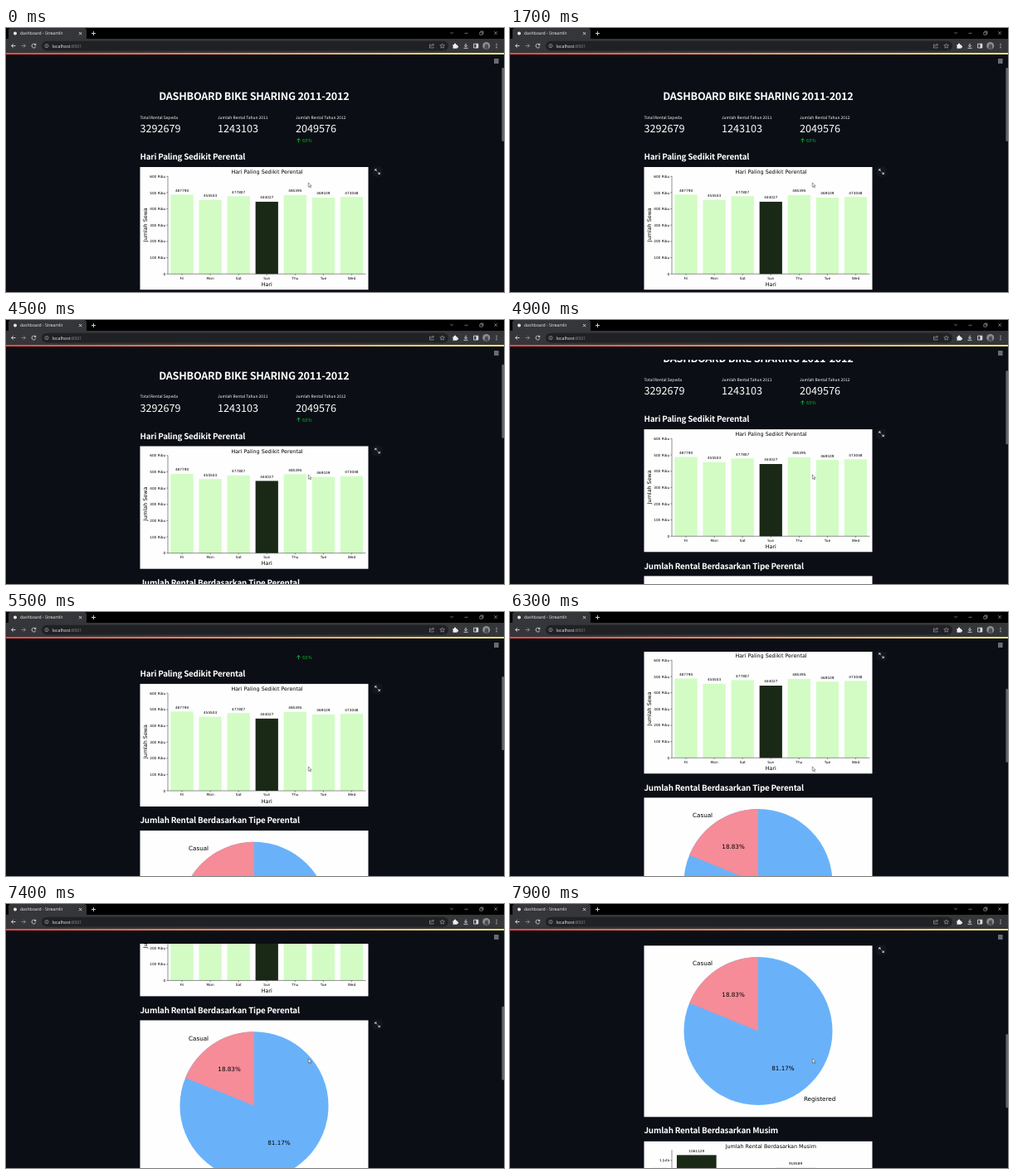
An HTML page for the animation above (8 s loop, 600 by 319 pixels).

```html
<!DOCTYPE html>
<html lang="id">
<head>
<meta charset="utf-8">
<title>Dashboard</title>
<style>
  html, body { margin: 0; width: 100%; height: 100%; overflow: hidden; background: #0b0e15; }
  svg { display: block; width: 100%; height: 100%; text-rendering: geometricPrecision; }
  .app { font-family: "Noto Sans CJK JP", "Noto Sans CJK SC", "Noto Sans CJK", sans-serif; fill: #fff; }
  .plot { font-family: "DejaVu Sans", sans-serif; fill: #000; }
  .ui { font-family: "Open Sans", "Noto Sans", sans-serif; fill: #f4f5f7; }
  .bold { font-weight: 600; letter-spacing: -.02em; }
  .icon { fill: none; stroke: #dcdee2; stroke-width: .9; }
  .thin { fill: none; stroke: #b4b6ba; stroke-width: .6; }
  .axis { fill: none; stroke: #222; stroke-width: .5; }
</style>
</head>
<body>
<svg id="stage" viewBox="0 0 600 319"></svg>
<script>
const LOOP = 8000, STEP = 100;
const PINK = '#f58c98', BLUE = '#69b2fa', LIGHT = '#d2fcc4', DARK = '#1a2916', GREEN = '#15b034';

// y is the middle of the capitals
const text = (cls, x, y, size, str, anchor = 'start', extra = '') =>
  `<text class="${cls}" x="${x}" y="${y + size * .365}" font-size="${size}" text-anchor="${anchor}" ${extra}>${str}</text>`;
const rect = (x, y, w, h, fill, r = 0) =>
  `<rect x="${x}" y="${y}" width="${w}" height="${h}" rx="${r}" fill="${fill}"/>`;
const path = (d, cls = 'icon', extra = '') => `<path class="${cls}" d="${d}" ${extra}/>`;
const label = (x, y, size, str, anchor = 'middle') => text('plot', x, y, size, str, anchor);
const heading = (y, str) => text('app bold', 161.5, y, 9.8, str);
const paper = (y, h) => rect(161.5, y, 275, h, '#fdfefd');

function barColumn(center, top, bottom, width, value, fill) {
  return rect(center - width / 2, top, width, bottom - top, fill) + label(center, top - 5.1, 4.26, value);
}

function yTick(y, str) {
  return path(`M193.3 ${y}H195`, 'axis') + label(192.2, y, 4.26, str, 'end');
}

function metrics() {
  const items = [
    [161.5, 'Total Rental Sepeda', 3292679],
    [255, 'Jumlah Rental Tahun 2011', 1243103],
    [349, 'Jumlah Rental Tahun 2012', 2049576]
  ];
  return items.map(([x, name, value]) =>
    text('app', x, 108, 4.92, name) + text('app', x, 121.7, 12.65, value)).join('') +
    path('M352.5 138.4V133.6M350.4 135.7L352.5 133.6L354.6 135.7', 'icon', `style="stroke:${GREEN}"`) +
    text('app', 357, 136, 5.75, '65%', 'start', `style="fill:${GREEN}"`);
}

function dayChart() {
  const days = { Fri: 487790, Mon: 455503, Sat: 477807, Sun: 444027, Thu: 485395, Tue: 469109, Wed: 473048 };
  const base = 297.2, per100 = 19.65, pitch = 34.07;
  let out = paper(168, 148.2) + label(314.5, 173.8, 6.39, 'Hari Paling Sedikit Perental');
  Object.entries(days).forEach(([day, value], i) => {
    const x = 195 + pitch * (i + .5);
    out += barColumn(x, base - value / 1e5 * per100, base, pitch * .8, value, day === 'Sun' ? DARK : LIGHT) +
      path(`M${x} ${base}v1.7`, 'axis') + label(x, base + 4.8, 4.26, day);
  });
  for (let i = 0; i <= 6; i++) out += yTick(base - i * per100, i ? `${i}00 Ribu` : '0');
  return out + path(`M195 179.2V${base}H433.5`, 'axis') +
    label(314.3, 309.4, 6.39, 'Hari') +
    text('plot', 0, 0, 6.39, 'Jumlah Sewa', 'middle', 'transform="translate(167.3 237.7) rotate(-90)"');
}

function pieChart() {
  const cx = 299, cy = 448.5, r = 89.5, share = .1883;
  const at = (angle, k) => [cx - r * k * Math.sin(angle), cy - r * k * Math.cos(angle)];
  const turn = share * 2 * Math.PI, mid = turn / 2;
  const [ex, ey] = at(turn, 1);
  return paper(345.3, 207) +
    `<circle cx="${cx}" cy="${cy}" r="${r}" fill="${BLUE}"/>` +
    `<path d="M${cx} ${cy}V${cy - r}A${r} ${r} 0 0 0 ${ex} ${ey}Z" fill="${PINK}"/>` +
    label(...at(mid, 1.1), 7.2, 'Casual', 'end') + label(...at(mid, .6), 7.2, '18.83%') +
    label(...at(mid + Math.PI, 1.1), 7.2, 'Registered', 'start') +
    label(...at(mid + Math.PI, .6), 7.2, '81.17%');
}

function seasonChart() {
  const million = 604.8, per100 = 10.5;
  const top = value => million + (1e6 - value) / 1e5 * per100;
  return paper(581.8, 150) + label(314.3, 587.8, 6.39, 'Jumlah Rental Berdasarkan Musim') +
    barColumn(224.8, top(1061129), 710, 47.7, 1061129, DARK) +
    barColumn(344, top(918589), 710, 47.7, 918589, LIGHT) +
    yTick(million, '1 Juta') + yTick(million + per100, '900 Ribu') +
    path('M195 592V710', 'axis');
}

function expandButton(id, y) {
  return `<g id="${id}">` + rect(441.5, y - 6, 12, 12, '#12161e', 3) +
    path(`M447 ${y - .6}l-2-2M446.6 ${y - 2.8}h-1.9v1.9M448 ${y + .6}l2 2M448.4 ${y + 2.8}h1.9v-1.9`) + '</g>';
}

function browser() {
  return rect(0, 0, 600, 13.5, '#000') + rect(3, 0, 94, 15, '#35363a', 3) +
    rect(0, 13, 600, 17, '#35363a') + rect(43, 15.8, 490, 11.6, '#202124', 5.8) +
    '<circle cx="11" cy="6.6" r="2" fill="#eee"/>' +
    text('ui', 17, 6.6, 5.1, 'dashboard - Streamlit') +
    text('ui', 55.5, 21.6, 5.3, 'localhost<tspan fill="#8f9399">:8501</tspan>') +
    path('M88 5l3.2 3.2M91.2 5L88 8.2M105.5 4v5M103 6.5h5') +
    path('M535.2 5l1.8 1.8L538.8 5M552.5 6.3h4M570.8 5h3.2v3.2h-3.2zM572 5V4h3v3h-1M588.2 4.2l3.6 3.6M591.8 4.2l-3.6 3.6', 'thin') +
    path('M11.5 21.5H6.6M8.9 19.2L6.6 21.5L8.9 23.8') +
    path('M18.5 21.5H23.4M21.1 19.2L23.4 21.5L21.1 23.8', 'icon', 'opacity=".5"') +
    path('M35.5 20.2A2.4 2.4 0 1 0 35.8 22.3M35.8 18.8V20.6H34') +
    '<circle class="thin" cx="49" cy="21.6" r="2.1"/>' + path('M49 21.3v1.4M49 20.2v.5', 'thin') +
    path('M512.5 20h-2v4h4.6v-1.3M512 22.5q.4-2.4 3.2-2.4M514 18.8l1.5 1.3l-1.5 1.4', 'thin') +
    path('M525.6 18.9l.8 1.8 2 .2-1.5 1.3.4 2-1.7-1-1.7 1 .4-2-1.5-1.3 2-.2z', 'thin') +
    path('M538.5 20h1.5a1.1 1.1 0 1 1 2 0h1.5v1.6a1.1 1.1 0 1 1 0 2v1.1h-5z', '', 'fill="#eee"') +
    path('M554 18.7v3.8M552.2 20.9l1.8 1.8 1.8-1.8M551.5 24.3h5') +
    path('M563.6 19.2h5.2v4.8h-5.2z') + rect(566.4, 19.2, 2.4, 4.8, '#dcdee2') +
    '<circle cx="578.7" cy="21.4" r="4.5" fill="#8e8e91"/>' +
    path('M577 25.6c-1-3 0-6 2-6.4 2 0 2.6 3 1.8 6.3z', '', 'fill="#4d4d51"') +
    [19.3, 21.5, 23.7].map(y => `<circle cx="591" cy="${y}" r=".6" fill="#eee"/>`).join('');
}

document.getElementById('stage').innerHTML =
  '<defs><linearGradient id="ribbon"><stop stop-color="#f8484b"/><stop offset="1" stop-color="#f2ec70"/></linearGradient></defs>' +
  rect(0, 0, 600, 319, '#0b0e15') +
  '<g id="page">' +
    text('app bold', 298.8, 82.5, 12.65, 'DASHBOARD BIKE SHARING 2011-2012', 'middle') +
    metrics() +
    heading(155.7, 'Hari Paling Sedikit Perental') + dayChart() +
    heading(333, 'Jumlah Rental Berdasarkan Tipe Perental') + pieChart() +
    heading(568.8, 'Jumlah Rental Berdasarkan Musim') + seasonChart() +
    expandButton('expandDays', 173.6) + expandButton('expandPie', 350.6) +
  '</g>' +
  rect(0, 29, 600, 19, '#0b0e15') +
  path('M588 38h5.6M588 40h5.6M588 42h5.6') +
  '<rect id="thumb" x="597.4" width="2.6" height="89" rx="1" fill="#63666c"/>' +
  browser() + rect(0, 30, 600, 2, 'url(#ribbon)') +
  path('M364.3 186.8v5.4l1.3-1.1.9 1.9.9-.4-.9-1.9h1.6z', '', 'fill="#fff" stroke="#333" stroke-width=".5"');

const page = document.getElementById('page');
const thumb = document.getElementById('thumb');
const expandDays = document.getElementById('expandDays');
const expandPie = document.getElementById('expandPie');

// [start ms, end ms, scroll distance]
const swipes = [[4100, 5000, 37.2], [5000, 5800, 64.3], [6000, 6800, 61.5], [7100, 7900, 132]];

function scrollAt(time) {
  return swipes.reduce((sum, [start, end, distance]) => {
    const p = Math.min(1, Math.max(0, (time - start) / (end - start)));
    return sum + distance * p * p * (3 - 2 * p);
  }, 0);
}

function draw(now) {
  const scroll = scrollAt(Math.floor(now % LOOP / STEP) * STEP);
  page.setAttribute('transform', `translate(0 ${-scroll})`);
  thumb.setAttribute('y', 48 + scroll * .37);
  expandDays.setAttribute('visibility', scroll < 127 ? 'visible' : 'hidden');
  expandPie.setAttribute('visibility', scroll > 164 ? 'visible' : 'hidden');
}

const began = performance.now();
function tick() {
  draw(performance.now() - began);
  requestAnimationFrame(tick);
}
tick();
</script>
</body>
</html>
```
